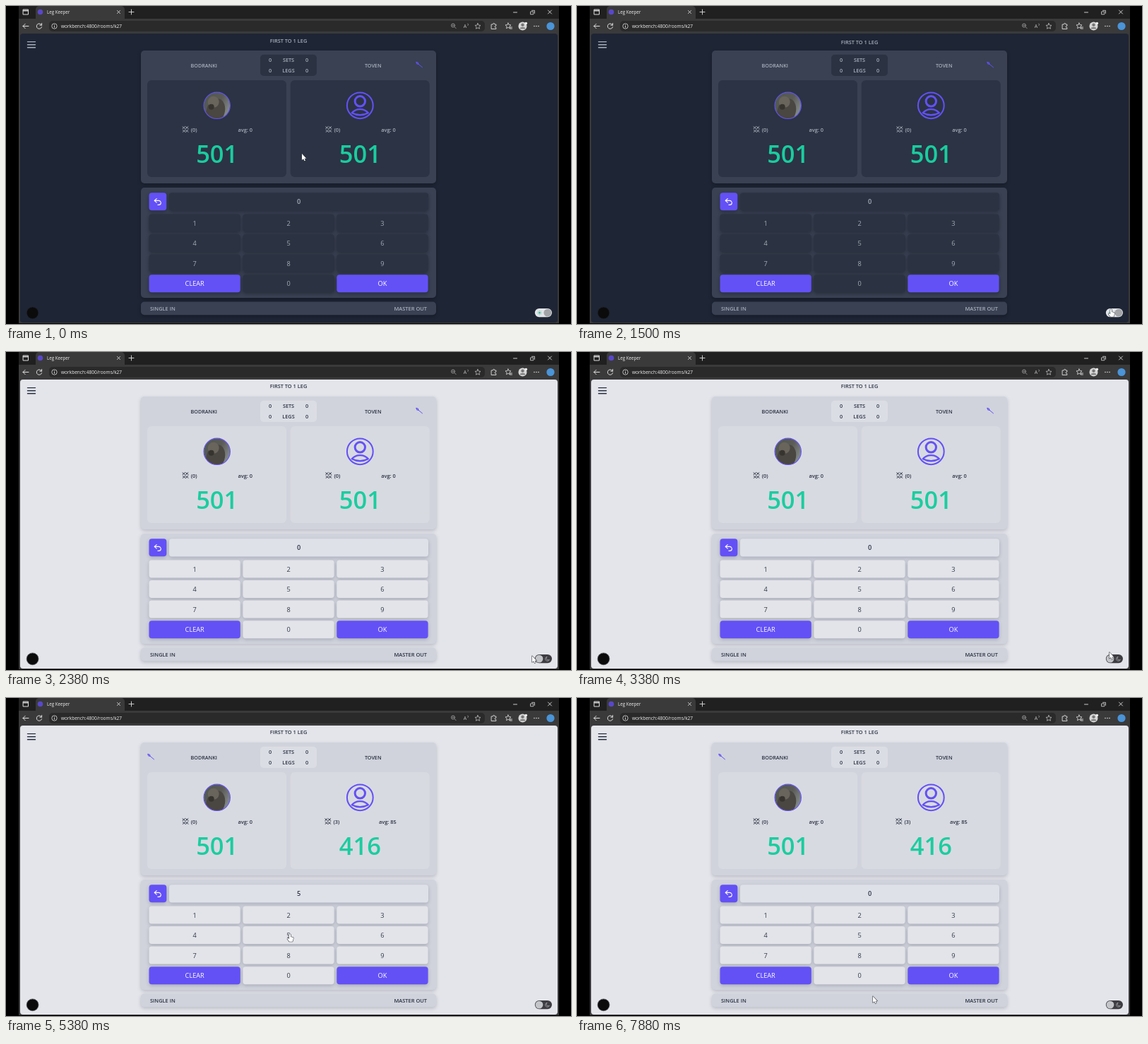
Animation, 800 px wide and 450 px high, one loop 8000 ms. Source, as an HTML page with a canvas:

```html
<!DOCTYPE html>
<html lang="en">
<head>
<meta charset="utf-8">
<title>Score board</title>
<style>
html, body { margin: 0; width: 100%; height: 100%; overflow: hidden; background: #000; }
canvas { display: block; width: 800px; height: 450px; }
</style>
</head>
<body>
<canvas id="stage"></canvas>
<script>
const canvas = document.getElementById('stage');
const ctx = canvas.getContext('2d');
const dpr = window.devicePixelRatio || 1;
canvas.width = 800 * dpr;
canvas.height = 450 * dpr;

const LOOP = 8000, STEP = 125;
const PURPLE = '#6351f6', GREEN = '#1acd9f';
const FONT = '"Open Sans", "Noto Sans", sans-serif';

const DARK = {
  page: '#1e2535', card: '#394153', inner: '#2b3344', sets: '#2b3343', low: '#394153',
  field: '#2b3343', key: '#2b3342', keyText: '#a3aab6', text: '#a9b0bc', shadow: 'rgba(0,0,0,.3)'
};
const LIGHT = {
  page: '#e4e5eb', card: '#d0d3dc', inner: '#d8dae1', sets: '#dbdde4', low: '#d0d3dc',
  field: '#dfe1e9', key: '#e3e4e9', keyText: '#323a48', text: '#283040', shadow: 'rgba(60,65,85,.25)'
};
const BLEND = { ...LIGHT, card: '#b5b8bf', inner: '#c8cbd5', sets: '#c8cbd4', low: '#d1d4dd', key: '#c5c7ce', keyText: '#5f656f' };

// step, x, y of the pointer tip, shape
const PATH = [
  [0, 419, 209, 'arrow'], [3, 419, 209, 'arrow'], [10, 756, 429, 'arrow'],
  [11, 756, 429, 'hand'], [15, 757, 429, 'hand'], [17, 745, 430, 'arrow'],
  [25, 745, 430, 'arrow'], [28, 757, 423, 'arrow'], [30, 402, 361, 'hand'],
  [31, 402, 361, 'hand'], [32, 402, 334, 'hand'], [33, 402, 334, 'hand'],
  [35, 498, 389, 'hand'], [37, 498, 389, 'hand'], [41, 402, 334, 'hand'],
  [44, 402, 334, 'hand'], [45, 402, 361, 'hand'], [47, 402, 361, 'hand'],
  [49, 498, 389, 'hand'], [50, 498, 389, 'hand'], [51, 346, 327, 'arrow'],
  [53, 346, 327, 'arrow'], [56, 216, 275, 'hand'], [60, 216, 275, 'hand'],
  [61, 260, 310, 'arrow'], [63, 419, 422, 'arrow']
];

function box(x, y, w, h, r, fill) {
  ctx.beginPath();
  ctx.roundRect(x, y, w, h, r);
  ctx.fillStyle = fill;
  ctx.fill();
}

function raised(x, y, w, h, r, fill, shadow) {
  ctx.save();
  ctx.shadowColor = shadow;
  ctx.shadowBlur = 5 * dpr;
  ctx.shadowOffsetY = 2 * dpr;
  box(x, y, w, h, r, fill);
  ctx.restore();
}

function disc(x, y, r, fill) {
  ctx.beginPath();
  ctx.arc(x, y, r, 0, 7);
  ctx.fillStyle = fill;
  ctx.fill();
}

function ring(x, y, r, color, width) {
  ctx.beginPath();
  ctx.arc(x, y, r, 0, 7);
  ctx.strokeStyle = color;
  ctx.lineWidth = width;
  ctx.stroke();
}

function stroke(d, color, width, x = 0, y = 0) {
  ctx.save();
  ctx.translate(x, y);
  ctx.strokeStyle = color;
  ctx.lineWidth = width;
  ctx.lineCap = ctx.lineJoin = 'round';
  ctx.stroke(new Path2D(d));
  ctx.restore();
}

function label(str, x, y, size, color, weight = 400, align = 'center') {
  ctx.font = `${weight} ${size}px ${FONT}`;
  ctx.textAlign = align;
  ctx.fillStyle = color;
  ctx.fillText(str, x, y + size * 0.357);
}

function browser() {
  ctx.fillStyle = '#000';
  ctx.fillRect(0, 0, 800, 450);
  ctx.fillStyle = '#202020';
  ctx.fillRect(18, 0, 765, 18);
  ctx.fillStyle = '#3a3a3b';
  ctx.fillRect(18, 18, 765, 431);
  box(42, 0, 126, 20, [5, 5, 0, 0], '#3a3a3b');
  disc(48.5, 8.5, 3.8, '#5947c9');
  label('Leg Keeper', 58, 8.5, 6.2, '#eee', 400, 'left');

  const ink = '#dedede';
  stroke('M-3.5-3.5h7v7h-7zM-3.5-2.2h7M-3.5-1.6h7', ink, 1, 28, 8.5);
  stroke('M-2-2l4 4M2-2l-4 4', ink, .9, 159.5, 8.5);
  stroke('M-3.5 0h7M0-3.5v7', ink, .9, 177.5, 8.5);
  stroke('M-2.5 0h5', ink, .9, 721, 9);
  stroke('M-2.5-1h3.8v3.8h-3.8zM-1-2.7h4v4', ink, .8, 745.5, 9);
  stroke('M-2.5-2.5l5 5M2.5-2.5l-5 5', ink, .9, 770, 8.5);

  box(61, 21, 617, 15, 5, '#2a2a2b');
  stroke('M4 0h-8M-.8-3.2l-3.2 3.2 3.2 3.2', ink, 1, 28, 28.5);
  stroke('M3.4-1.5A3.7 3.7 0 1 0 3.6 1.2M3.6-4v2.7h-2.7', ink, 1, 47, 28.5);
  ring(68.5, 28.5, 3.7, ink, .8);
  stroke('M0-.3v2M0-1.8v.1', ink, .9, 68.5, 28.5);
  label('workbench:4800/rooms/k27', 78, 28.5, 6.55, '#f0f0f0', 400, 'left');
  stroke('M1.6 1.6L3.6 3.6M2-.5A2.5 2.5 0 1 1-3-.5 2.5 2.5 0 1 1 2-.5M-1.5-.5h2', '#aaa', .8, 633.5, 28);
  label('A', 650, 29, 7, '#bbb');
  stroke('M0-2q1.4 1.2 0 2.5', '#bbb', .7, 654, 27);
  const star = 'M0-4l1.2 2.6 2.8.3-2.1 2 .6 2.8L0 2.3-2.5 3.7l.6-2.8L-4-1.1l2.8-.3z';
  stroke(star, '#bbb', .8, 668, 28.5);
  stroke('M-3-2.5h2q0-1.6 1.2-1.6t1.2 1.6h2v2.2q-1.8 0-1.8 1.2t1.8 1.2v1.9h-6.4z', ink, .9, 690.5, 28.5);
  stroke(star, ink, .8, 711, 28);
  stroke('M2 1.5h3M2 3.5h3', ink, .9, 711.5, 28.5);
  disc(731.5, 28.5, 6, '#d7d7d7');
  disc(731.5, 26.8, 2.2, '#777');
  ctx.beginPath();
  ctx.ellipse(731.5, 32.3, 3.8, 2.3, 0, Math.PI, 0);
  ctx.fill();
  disc(736.3, 24.6, 1.8, '#eee');
  [-3, 0, 3].forEach(d => disc(751 + d, 28.5, .8, ink));
  disc(771, 28.5, 5.6, '#4a94d8');
}

function avatar(x, y) {
  ctx.save();
  ctx.beginPath();
  ctx.arc(x, y, 18.5, 0, 7);
  ctx.clip();
  const g = ctx.createLinearGradient(x - 18, y - 12, x + 18, y + 12);
  g.addColorStop(0, '#50594f');
  g.addColorStop(.5, '#5b5b58');
  g.addColorStop(1, '#8a9392');
  ctx.fillStyle = g;
  ctx.fillRect(x - 19, y - 19, 38, 38);
  ctx.fillStyle = '#4a4641';
  ctx.beginPath();
  ctx.ellipse(x - 2, y + 8, 13, 18, .3, 0, 7);
  ctx.fill();
  disc(x - 5, y - 5, 8, '#69645c');
  disc(x - 8, y + 2, 4, '#37342f');
  ctx.restore();
  ring(x, y, 18.7, PURPLE, 1.1);
}

function person(x, y) {
  ring(x, y, 18.4, PURPLE, 2);
  ring(x, y - 6, 7.2, PURPLE, 3);
  stroke('M-11.5 10.5Q-7.5 5.3 0 5.3T11.5 10.5Q6 13.5 0 13.5T-11.5 10.5z', PURPLE, 2.4, x, y);
}

function dart(x, y) {
  stroke('M-1.5-1.2L4.5 3.8', PURPLE, 1, x, y);
  stroke('M-4.2-3.6l1 2.4 2.2.6-.6-2.2z', PURPLE, 1.1, x, y);
}

function darts(x, y, color) {
  for (const [dx, dy] of [[-2.3, -2.2], [2.3, -2.2], [-2, 2.5], [2.2, 2.5]])
    stroke('M-1.7-1.3l1.5 1.2 1.8-1.4M-.5.2l-1 1.4M.3.3l1.6 1.1', color, .9, x + dx, y + dy);
}

function player(x, score, thrown, avg, c) {
  const shift = thrown ? 1 : 0;
  box(x, 105, 197, 137, 6, c.inner);
  const mid = x + 98.7;
  darts(x + 54 - shift, 174.3, c.text);
  label(`(${thrown})`, x + 61.7 - shift, 175, 7.4, c.text, 600, 'left');
  label(`avg: ${avg}`, x + 138.8 - shift * 1.2, 175, 7.4, c.text, 600);
  label(score, mid, 209.5, 34.5, GREEN, 600);
}

function keypad(entry, c) {
  raised(191, 257, 418, 156, 5, c.low, c.shadow);
  raised(202.5, 264.3, 24.8, 25, 4, PURPLE, c.shadow);
  stroke('M-1.5-4.2L-4.7-1.4-1.5 1.4M-4.5-1.4H1.5a3 3 0 0 1 0 6H.2', '#fff', 1.1, 214.8, 276.8);
  raised(231, 264.3, 367, 25.2, 4, c.field, c.shadow);
  label(entry, 414.5, 277, 9.2, c.text, 600);
  ['1', '2', '3', '4', '5', '6', '7', '8', '9', 'CLEAR', '0', 'OK'].forEach((key, i) => {
    const x = 202.5 + (i % 3) * 132.9, y = 294.5 + Math.floor(i / 3) * 28.55;
    const main = key.length > 1;
    raised(x, y, 129.3, 25, 4, main ? PURPLE : c.key, c.shadow);
    label(key, x + 64.7, y + 13, 9.2, main ? '#fff' : c.keyText);
  });
}

function toggle(dark) {
  box(748.8, 428, 24.2, 12.2, 6.1, dark ? '#e3e5e9' : '#3d3d42');
  if (dark) {
    disc(766.8, 434.1, 5.4, '#a2a4a8');
    disc(755.5, 434.1, 1.5, '#4fb9a0');
    for (let a = 0; a < 8; a++) {
      const s = Math.sin(a * Math.PI / 4), q = Math.cos(a * Math.PI / 4);
      stroke(`M${s * 2.4} ${q * 2.4}L${s * 3.1} ${q * 3.1}`, '#4fb9a0', .6, 755.5, 434.1);
    }
  } else {
    disc(755, 434.1, 5.4, '#c4c5c9');
    stroke('M-.8-2.8A3 3 0 1 0 2.8 1.2 2.7 2.7 0 0 1-.8-2.8z', '#a8a9ad', .8, 766.5, 434.1);
  }
}

function pointer(n) {
  let i = PATH.length - 1;
  while (PATH[i][0] > n) i--;
  const a = PATH[i], b = PATH[i + 1] || a;
  const k = b === a ? 0 : (n - a[0]) / (b[0] - a[0]);
  const ease = k * k * (3 - 2 * k);
  ctx.save();
  ctx.translate(a[1] + (b[1] - a[1]) * ease, a[2] + (b[2] - a[2]) * ease);
  const shape = new Path2D(a[3] === 'arrow'
    ? 'M0 0V9L2.1 7.2 3.5 10.2 4.9 9.5 3.6 6.7H6.2z'
    : 'M-1 .6Q0-.6 1 .6V4L4.3 4.8Q5 5 4.9 6L4.3 9.2 3.5 10.8H-.7L-3.6 7.2Q-3.6 5.7-2.2 6.2L-1 7z');
  ctx.lineJoin = 'round';
  ctx.lineWidth = 1.1;
  ctx.strokeStyle = '#33363d';
  ctx.stroke(shape);
  ctx.fillStyle = '#fff';
  ctx.fill(shape);
  ctx.restore();
}

function entryAt(n) {
  if (n >= 31 && n < 36) return n < 33 ? '8' : '85';
  if (n >= 43 && n < 50) return n < 46 ? '5' : '58';
  return '0';
}

function draw(t) {
  const n = Math.floor(t / STEP);
  const dark = n < 13;
  const c = dark ? DARK : n === 13 ? BLEND : LIGHT;
  const homeHit = n >= 50 && n < 58, awayHit = n >= 36;
  const homeTurn = (n >= 36 && n < 50) || n >= 58;

  ctx.setTransform(dpr, 0, 0, dpr, 0, 0);
  browser();
  box(20, 39, 761, 409, 4, c.page);
  stroke('M30.5 50.6h11M30.5 54.7h11M30.5 58.8h11', c.text, 1.4);
  const titleY = n % 2 ? 48.7 : 49.5 + Math.min(n / 12, 1) * 1.5;
  label('FIRST TO 1 LEG', 400, titleY, 7.4, c.text, 600);

  raised(191, 63, 418, 188, 5, c.card, c.shadow);
  box(360, 68.7, 80, 30.3, 5, c.sets);
  ['SETS', 'LEGS'].forEach((word, i) => {
    const y = 76.5 + i * 15;
    label(word, 400, y, 7.3, c.text, 600);
    label('0', 374, y, 7.3, c.text, 600);
    label('0', 426, y, 7.3, c.text, 600);
  });
  label('BODRANKI', 280.3, 84.3, 7.2, c.text, 600);
  label('TOVEN', 519.7, 84.3, 7.2, c.text, 600);
  dart(homeTurn ? 205 : 585, 83);

  player(200, homeHit ? '443' : '501', homeHit ? 3 : 0, homeHit ? 58 : 0, c);
  player(402.7, awayHit ? '416' : '501', awayHit ? 3 : 0, awayHit ? 85 : 0, c);
  avatar(298.7, 140.8);
  person(501.3, 140.8);

  keypad(entryAt(n), c);
  raised(191, 418.5, 418, 18.8, 5, c.low, c.shadow);
  label('SINGLE IN', 204, 428.2, 7.45, c.text, 600, 'left');
  label('MASTER OUT', 596, 428.2, 7.45, c.text, 600, 'right');

  disc(37.6, 434.3, 8.4, '#0b0b0c');
  ring(37.6, 434.3, 8.4, dark ? '#20242c' : '#55565a', .8);
  toggle(dark);
  pointer(n);
}

const start = performance.now();
function tick() {
  draw((performance.now() - start) % LOOP);
  requestAnimationFrame(tick);
}
tick();
</script>
</body>
</html>
```
